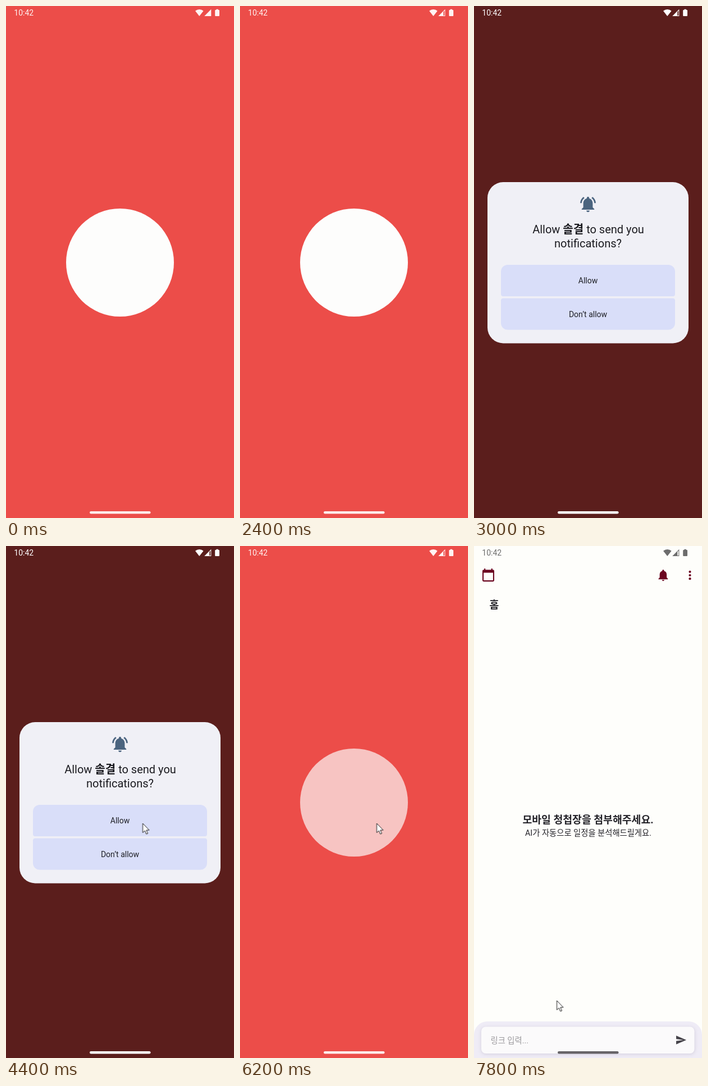
Recreate the animation shown at these times as an HTML page. Size 406 by 910 pixels, loop 8 s.

```html
<!DOCTYPE html>
<html lang="ko">
<head>
<meta charset="utf-8">
<title>App launch</title>
<style>
  html, body { margin: 0; width: 100%; height: 100%; overflow: hidden; background: #ec4d49; }
  svg { display: block; width: 100%; height: 100%; }
  text { font-family: Roboto, "Noto Sans CJK KR", "Noto Sans CJK", sans-serif; }
  .mid { text-anchor: middle; }
  .bold { font-weight: 700; }

  .timed { animation: 8s step-end infinite; }
  .logo { animation-name: logo; }
  .scrim { animation-name: scrim; }
  .dialog { animation-name: dialog; }
  .home { animation-name: home; }
  .status { animation-name: status; }
  .signal-gap { animation-name: signal-gap; }
  .handle { animation-name: handle; }
  .cursor { animation-name: cursor; }

  @keyframes logo { 0% { opacity: 1 } 77.5%, 100% { opacity: .68 } }
  @keyframes scrim { 0%, 60%, 100% { opacity: 0 } 32.5% { opacity: .61 } }
  @keyframes dialog { 0%, 60%, 100% { opacity: 0 } 35% { opacity: 1 } }
  @keyframes home { 0% { opacity: 0 } 80%, 100% { opacity: 1 } }
  @keyframes status { 0%, 60% { color: #fff3f2 } 32.5% { color: #fff } 80%, 100% { color: #6d6d6d } }
  @keyframes handle { 0%, 60% { fill: #fdeceb } 32.5% { fill: #fff } 80%, 100% { fill: #676468 } }
  @keyframes signal-gap {
    0% { opacity: 0 }
    2.5%, 60% { opacity: 1; fill: #ec4d49 }
    32.5% { opacity: 1; fill: #5c1f1c }
    80%, 100% { opacity: 1; fill: #fefefb }
  }
  @keyframes cursor {
    0% { opacity: 0; transform: translate(300px, 540px) }
    45% { opacity: 1; transform: translate(300px, 540px) }
    47.5% { opacity: 1; transform: translate(268px, 514px) }
    50% { opacity: 1; transform: translate(243.5px, 493px) }
    87.5% { opacity: 1; transform: translate(228px, 545px) }
    90% { opacity: 1; transform: translate(195px, 650px) }
    92.5% { opacity: 1; transform: translate(163px, 757px) }
    95%, 100% { opacity: 1; transform: translate(147.5px, 808px) }
  }
</style>
</head>
<body>
<svg viewBox="0 0 406 910" preserveAspectRatio="none">
  <defs>
    <filter id="soft" x="-10%" y="-30%" width="120%" height="160%">
      <feGaussianBlur stdDeviation="3"/>
    </filter>
    <path id="bell" d="M18 11c0-3.07-1.64-5.64-4.5-6.32V4a1.5 1.5 0 0 0-3 0v.68C7.63 5.36 6 7.92 6 11v5l-2 2v1h16v-1l-2-2zm-6 11a2 2 0 0 0 2-2h-4a2 2 0 0 0 2 2z"/>
  </defs>

  <rect width="406" height="910" fill="#ec4d49"/>
  <circle class="timed logo" cx="203" cy="456" r="96" fill="#fdfdfc"/>
  <rect class="timed scrim" width="406" height="910"/>

  <g class="timed dialog">
    <rect x="24" y="313" width="358" height="286.5" rx="28" fill="#f0f0f6"/>
    <g transform="translate(186.2 335.5) scale(1.4)" fill="#4b647f">
      <use href="#bell"/>
      <path d="M7.58 4.08 6.15 2.65C3.75 4.48 2.17 7.3 2.03 10.5h2c.15-2.65 1.51-4.97 3.55-6.42zm12.39 6.42h2c-.15-3.2-1.73-6.02-4.12-7.85l-1.42 1.43c2.02 1.45 3.39 3.77 3.54 6.42z"/>
    </g>
    <g class="mid" fill="#1b1b20" font-size="20">
      <text x="203.5" y="404">Allow <tspan class="bold">솔결</tspan> to send you</text>
      <text x="203" y="428.5">notifications?</text>
    </g>
    <g fill="#d9def9">
      <path d="M48 472a12 12 0 0 1 12-12H346a12 12 0 0 1 12 12V512a4 4 0 0 1-4 4H52a4 4 0 0 1-4-4z"/>
      <path d="M48 523.5a4 4 0 0 1 4-4H354a4 4 0 0 1 4 4V563.5a12 12 0 0 1-12 12H60a12 12 0 0 1-12-12z"/>
    </g>
    <g class="mid" fill="#1f2026" font-size="14">
      <text x="203" y="493">Allow</text>
      <text x="203" y="553">Don’t allow</text>
    </g>
  </g>

  <g class="timed home">
    <rect width="406" height="910" fill="#fefefb"/>
    <g fill="#6b0620">
      <path transform="translate(12.9 39) scale(1.05)" d="M20 3h-1V1h-2v2H7V1H5v2H4a2 2 0 0 0-2 2v16a2 2 0 0 0 2 2h16a2 2 0 0 0 2-2V5a2 2 0 0 0-2-2zm0 18H4V8h16z"/>
      <use href="#bell" transform="translate(324.4 39.4) scale(1.04)"/>
      <circle cx="384.5" cy="45.8" r="2.1"/>
      <circle cx="384.5" cy="52" r="2.1"/>
      <circle cx="384.5" cy="58.2" r="2.1"/>
    </g>
    <g fill="#242329">
      <text class="bold" x="27.5" y="110.5" font-size="18.3">홈</text>
      <text class="mid bold" x="203" y="492.5" font-size="18.3">모바일 청첩장을 첨부해주세요.</text>
      <text class="mid" x="203.5" y="515" font-size="14.3">AI가 자동으로 일정을 분석해드릴게요.</text>
    </g>
    <path d="M0 910V869a24 24 0 0 1 24-24H382a24 24 0 0 1 24 24V910z" fill="#efecf6"/>
    <rect x="13" y="856" width="380" height="47" rx="8" fill="#b9b4c6" opacity=".55" filter="url(#soft)"/>
    <rect x="13" y="854.5" width="379.5" height="47.5" rx="8" fill="#fbfafb"/>
    <text x="29.5" y="884" font-size="14.3" fill="#9b999d">링크 입력...</text>
    <path transform="translate(358.3 867.7) scale(.86)" fill="#47444b" d="M2 21 23 12 2 3v7l15 2-15 2z"/>
  </g>

  <g class="timed status" fill="currentColor">
    <text x="14.3" y="17" font-size="14">10:42</text>
    <path d="M344.3 18 337 8.7a11.6 11.6 0 0 1 14.6 0z"/>
    <path d="M365.3 5.8V18H353.2z"/>
    <path d="M374.3 7V5.8h3.6V7h1.1q1 0 1 1v9q0 1-1 1h-5.8q-1 0-1-1V8q0-1 1-1z"/>
  </g>
  <path class="timed signal-gap" d="M362.3 10.3 364.3 8.3V17h-2z"/>
  <rect class="timed handle" x="149" y="898" width="108.5" height="4.4" rx="2.2"/>

  <path class="timed cursor" d="M0 0V16.5L3.8 13 6.3 19 9 18 6.5 12H11.5z" fill="#fff" stroke="#1a1a1a" stroke-linejoin="round"/>
</svg>
</body>
</html>
```
